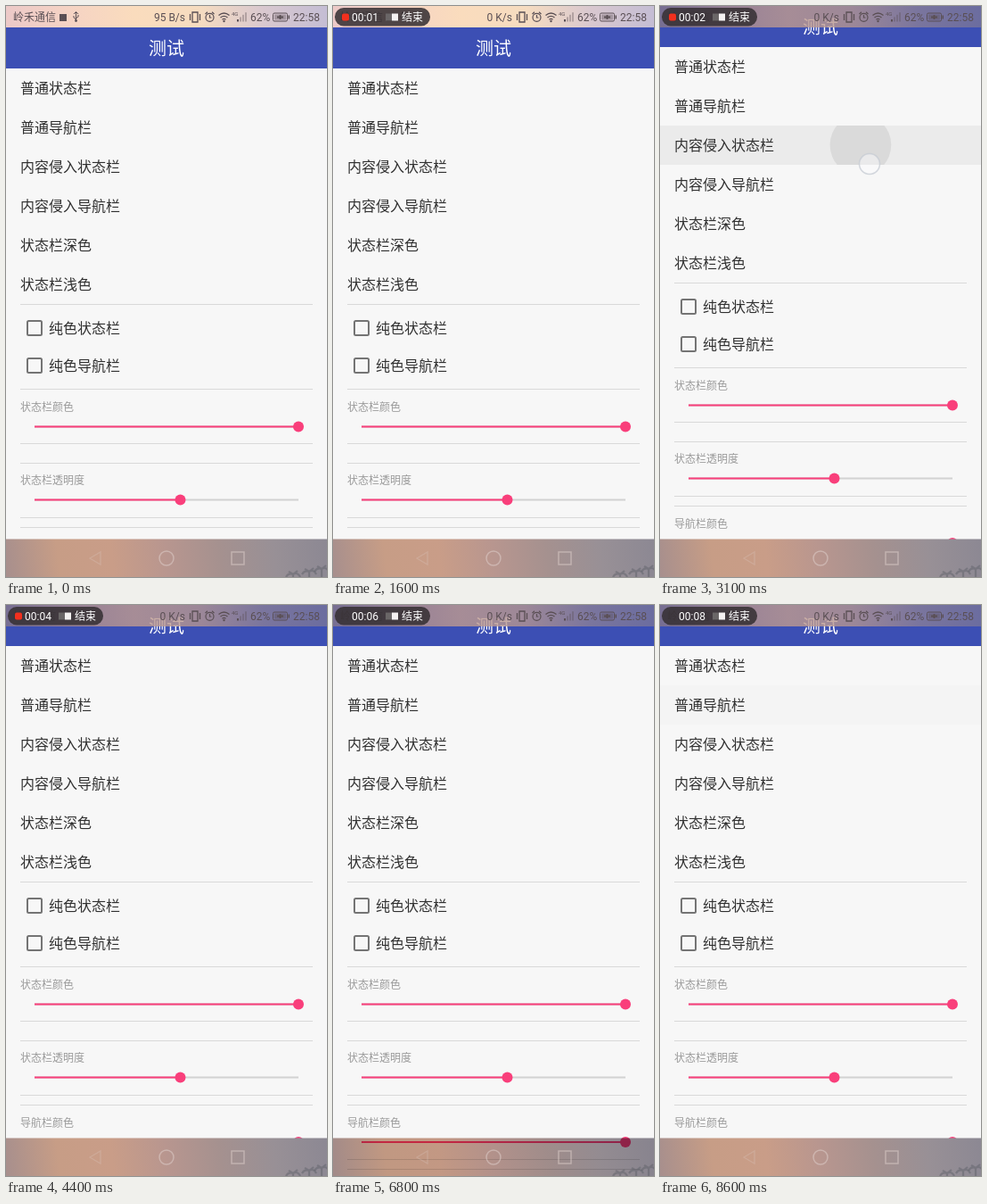
These frames come from a looping animation (360x640 px, 8700 ms). An HTML page with a canvas:

```html
<!DOCTYPE html>
<html lang="zh-CN">
<head>
<meta charset="utf-8">
<style>
html, body { margin: 0; width: 100%; height: 100%; overflow: hidden; background: #f7f7f7; }
canvas { display: block; width: 360px; height: 640px; }
</style>
</head>
<body>
<canvas id="stage" width="360" height="640"></canvas>
<script>
const c = document.getElementById('stage').getContext('2d');
const LOOP = 8700, PINK = '#f93f7b', INK = '#5a4f54';
const FONT = 'Roboto, "Noto Sans CJK SC", "Noto Sans CJK", sans-serif';
const ROWS = ['普通状态栏', '普通导航栏', '内容侵入状态栏', '内容侵入导航栏', '状态栏深色', '状态栏浅色'];
const DIVIDERS = [334, 429, 490, 512, 573, 584, 645, 656];
const SLIDERS = [['状态栏颜色', 471.5, 328], ['状态栏透明度', 553.5, 195.5], ['导航栏颜色', 626, 328]];
const SKY = ['#ecc9c8', '#f5d3c4', '#fadcbd', '#f6dcc0', '#d9c8cf', '#c4bdd4'];
const DIM_SKY = ['#85768a', '#ad8d8e', '#c19c8f', '#b59691', '#8a7f98', '#77749a'];
const DUSK = ['#a78f8d', '#c79d86', '#c99d88', '#b8968f', '#a5918f', '#989096', '#8c8893'];
// Each tap: start time, list row, position; its effect lands APPLY ms later.
const TAPS = [
  { at: 2800, row: 2, x: 235, y: 177 },
  { at: 5500, row: 3, x: 228, y: 205 },
  { at: 7700, row: 1, x: 226, y: 116 }
];
const APPLY = 250;
// Times at which the recording dot switches, starting visible.
const BLINK = [850, 1300, 2000, 2450, 3400, 4050, 4950, 5400, 6050, 6350, 6650, 7150, 8050];

const clamp = v => Math.max(0, Math.min(1, v));

function text(s, x, y, size, color, align = 'left') {
  c.font = size + 'px ' + FONT;
  c.fillStyle = color;
  c.textAlign = align;
  c.fillText(s, x, y + size * 0.37);
}

function rect(x, y, w, h, color) {
  c.fillStyle = color;
  c.fillRect(x, y, w, h);
}

function disc(x, y, r, color) {
  c.fillStyle = color;
  c.beginPath();
  c.arc(x, y, r, 0, 7);
  c.fill();
}

function round(x, y, w, h, r) {
  c.beginPath();
  c.roundRect(x, y, w, h, r);
}

function stroke(path, color, width = 1.2) {
  c.strokeStyle = color;
  c.lineWidth = width;
  c.stroke(new Path2D(path));
}

function wallpaper(y, h, colors) {
  const g = c.createLinearGradient(0, y + h, 360, y);
  colors.forEach((color, i) => g.addColorStop(i / (colors.length - 1), color));
  rect(0, y, 360, h, g);
}

function drawRipple(tap, age, shift, shiftAtTap) {
  const top = 70 + 44 * tap.row;
  const shade = 0.048 * clamp((age - 100) / 150) * clamp((1050 - age) / 550);
  if (!shade) return;
  rect(0, top - shift, 360, 44, `rgba(0,0,0,${shade})`);
  const p = clamp((age - 100) / 470) ** 2;
  const startY = tap.y + shiftAtTap, endY = top + 22;
  c.save();
  c.beginPath();
  c.rect(0, top - shift, 360, 44);
  c.clip();
  disc(tap.x + (180 - tap.x) * p, startY + (endY - startY) * Math.min(1, p * 5) - shift,
    2 + 177 * p, `rgba(0,0,0,${0.07 * clamp((650 - age) / 300)})`);
  c.restore();
}

function drawPage(t, shift) {
  rect(0, 0, 360, 640, '#f7f7f7');
  TAPS.forEach((tap, i) => {
    if (t > tap.at) drawRipple(tap, t - tap.at, shift, i ? 24 : 0);
  });
  c.save();
  c.translate(0, -shift);
  rect(0, 24, 360, 46, '#3c4fb4');
  text('测试', 180, 48, 20, '#fff', 'center');
  ROWS.forEach((s, i) => text(s, 16, 92 + 44 * i, 16, '#303030'));
  DIVIDERS.forEach(y => rect(16, y, 328, 1, '#d9d9d9'));
  ['纯色状态栏', '纯色导航栏'].forEach((s, i) => {
    const y = 361 + 42 * i;
    round(24, y - 8, 16, 16, 1.5);
    c.strokeStyle = '#747474';
    c.lineWidth = 2;
    c.stroke();
    text(s, 48, y, 16, '#303030');
  });
  SLIDERS.forEach(([label, y, x]) => {
    text(label, 16, y - 21.8, 12, '#9b9b9b');
    rect(32, y - 1, 296, 2, '#d2d2d2');
    rect(32, y - 1, x - 32, 2, PINK);
    disc(x, y, 6, PINK);
  });
  c.restore();
}

function drawStatus(t, shifted) {
  c.globalAlpha = shifted ? 0.8 : 1;
  wallpaper(0, 24, shifted ? DIM_SKY : SKY);
  c.globalAlpha = 1;
  text('岭禾通信', 8, 12.5, 12, INK);
  rect(60, 9, 8, 8, INK);
  stroke('M78.5 7V17M76 9l2.5-2.5L81 9M76 11v2l2.5 2M81 10v2l-2.5 2', INK, 1);
  disc(78.5, 16.5, 1.4, INK);
  text(t < 1200 ? '95 B/s' : '0 K/s', 201, 12.5, 12, INK, 'right');
  stroke('M209 7h6v11h-6zM206.5 9v7M217.5 9v7', INK, 1.3);
  stroke('M224 12.8a4.5 4.5 0 1 0 9 0a4.5 4.5 0 1 0-9 0M228.5 10v3h2M223.5 9l2.5-2.3M233.5 9l-2.5-2.3', INK);
  stroke('M238.5 10.5q6-5 12 0M240.5 13q4-3.2 8 0M242.5 15.2q2-1.6 4 0', INK, 1.3);
  disc(244.5, 17, 1.2, INK);
  text('4G', 253, 9, 6, INK);
  for (let i = 0; i < 4; i++)
    rect(259 + 3 * i, 15 - 2.6 * i, 2, 2.5 + 2.6 * i, i < 1 ? INK : 'rgba(90,79,84,.35)');
  text('62%', 274, 12.5, 12, INK);
  round(299.5, 8, 16, 9, 1.5);
  c.strokeStyle = INK;
  c.lineWidth = 1;
  c.stroke();
  rect(301, 9.5, 13, 6, 'rgba(90,79,84,.4)');
  rect(316.5, 10.5, 1.5, 4, INK);
  stroke('M304 12.5h7M307.5 10v5', INK, 1.8);
  text('22:58', 352, 12.5, 12, INK, 'right');
}

function drawRecorder(t) {
  const show = clamp((t - 100) / 400);
  if (!show) return;
  c.globalAlpha = show;
  round(2, 2, 107, 20.5, 10);
  c.fillStyle = 'rgba(54,49,52,.87)';
  c.fill();
  if (BLINK.filter(b => t >= b).length % 2 === 0) {
    round(10, 8.5, 8, 8, 2);
    c.fillStyle = '#f2301e';
    c.fill();
  }
  const seconds = Math.max(0, Math.floor((t - 150) / 1000));
  text('00:0' + seconds, 21, 12.5, 12, '#fff');
  rect(59, 8.5, 7, 8, '#6a6667');
  rect(66, 8.5, 7, 8, '#f4f1f1');
  text('结束', 77, 12.5, 12, '#fff');
  c.globalAlpha = 1;
}

function drawNav(overlap) {
  if (overlap) c.globalCompositeOperation = 'multiply';
  wallpaper(597.5, 42.5, DUSK);
  c.globalCompositeOperation = 'source-over';
  const line = 'rgba(222,206,202,.55)';
  stroke('M94 619L106 612V626Z', 'rgba(222,206,202,.25)', 1.4);
  stroke('M172 619a8 8 0 1 0 16 0a8 8 0 1 0-16 0', line, 1.5);
  stroke('M253 612h14v14h-14z', line, 1.5);
  // Palm crowns in the corner
  for (const [x, y] of [[322, 637], [340, 634], [354, 631]])
    stroke(`M${x - 8} ${y + 3}q3-5 8-3q5-3 8 3M${x} ${y}v10M${x - 5} ${y - 3}l5 3l5-4`, 'rgba(96,98,106,.5)', 2.2);
}

function drawTouch(t) {
  TAPS.forEach(tap => {
    const age = t - tap.at;
    c.globalAlpha = clamp(age / 60) * clamp((450 - age) / 200);
    if (!c.globalAlpha) return;
    disc(tap.x, tap.y, 11.5, 'rgba(250,250,252,.65)');
    c.strokeStyle = '#c5cad3';
    c.lineWidth = 1.5;
    c.stroke();
  });
  c.globalAlpha = 1;
}

function frame(now) {
  const t = now % LOOP;
  const applied = TAPS.filter(tap => t >= tap.at + APPLY).length;
  drawPage(t, applied ? 24 : 0);
  drawStatus(t, applied > 0);
  drawRecorder(t);
  drawNav(applied === 2);
  drawTouch(t);
  requestAnimationFrame(frame);
}
requestAnimationFrame(frame);
</script>
</body>
</html>
```
